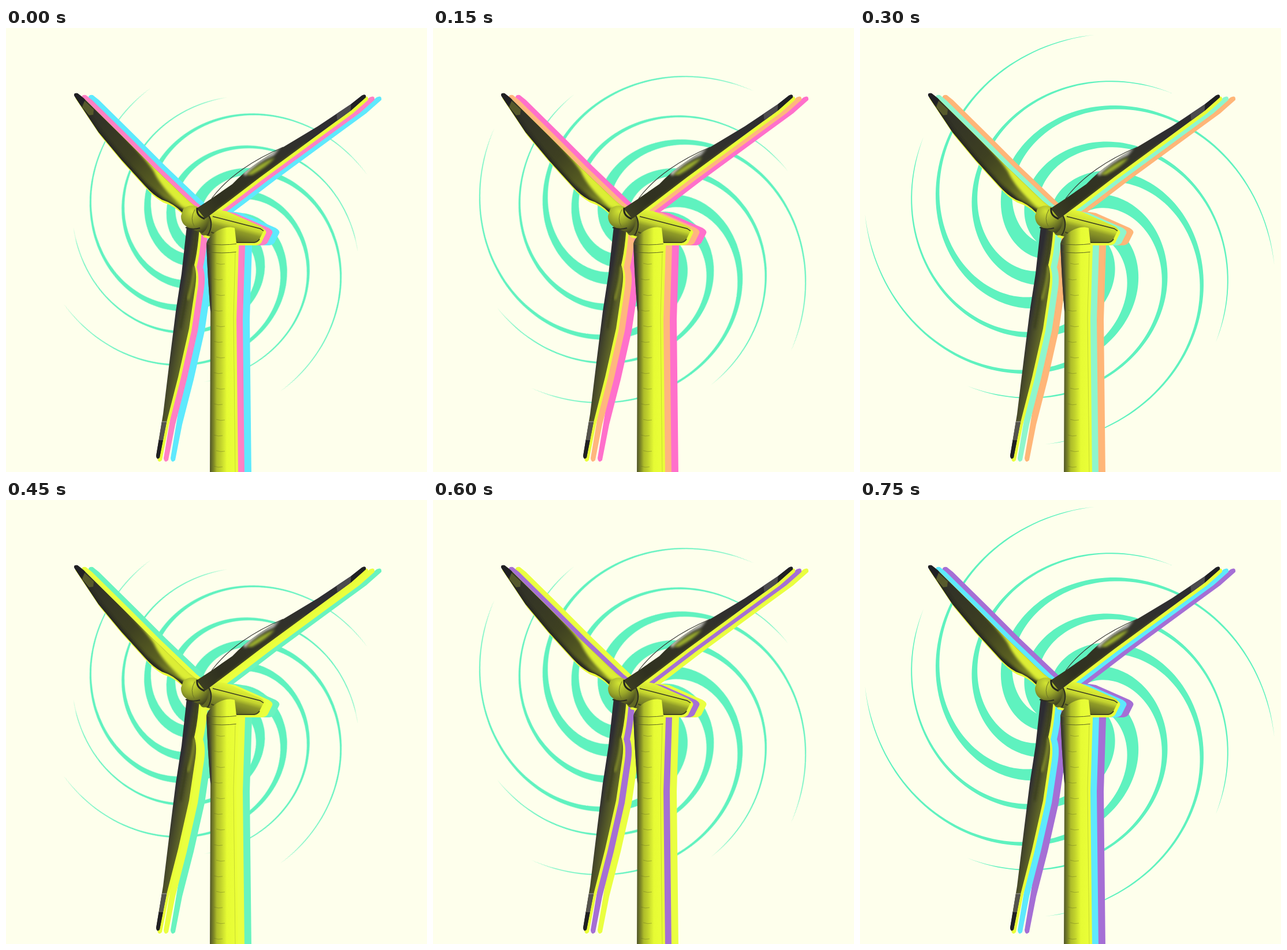
An HTML page for the animation above (900 ms loop, 729x768 px).

```html
<!DOCTYPE html>
<html lang="en">
<head>
<meta charset="utf-8">
<title>Wind turbine</title>
<style>
html, body { margin: 0; width: 100%; height: 100%; overflow: hidden; background: #feffec; }
svg { display: block; width: 729px; height: 768px; }
#spiral { fill: #5ff2bf; animation: spin 450ms step-end infinite; }
#near, #mid, #far { stroke-width: 2; stroke-linejoin: round; stroke: currentColor; fill: currentColor; }
#near { color: #eaff38; }
#mid { animation: midTint 900ms step-end infinite; }
#far { animation: farTint 900ms step-end infinite; }
@keyframes spin {
  0% { transform: translate(363px, 366px) rotate(60deg) scale(.8); }
  33.333% { transform: translate(363px, 366px) rotate(30deg) scale(.9); }
  66.667%, 100% { transform: translate(363px, 366px) rotate(0deg) scale(1); }
}
@keyframes midTint {
  0% { color: #ff80c4; }
  16.667% { color: #ffb67e; }
  33.333% { color: #8ef6cd; }
  50% { color: #eaff40; }
  66.667% { color: #a56fd5; }
  83.333%, 100% { color: #5ee9fd; }
}
@keyframes farTint {
  0% { color: #5ee9fd; }
  16.667% { color: #ff70cb; }
  33.333% { color: #ffb678; }
  50% { color: #69f3bf; }
  66.667% { color: #eaff40; }
  83.333%, 100% { color: #a56fd5; }
}
</style>
</head>
<body>
<svg viewBox="0 0 729 768">
  <defs>
    <path id="tower" d="M347 373 C350 357 378 339 396 346 L399 373 L395 500 L398 772 H353 L354 490 Q349 430 347 373Z"/>
    <path id="nacelle" d="M334 318 Q360 312 382 317 L441 343 Q448 347 446 351 L438 367 Q435 371 428 371 H392 L340 357Z"/>
    <path id="bladeLeft" d="M118 117 Q117 112 124 113 L134 121 L200 186 L250 236 L315 298 L330 310 L306 320 Q290 303 270 297 Q255 289 240 272 L200 228 L160 180 L132 138Z"/>
    <path id="bladeRight" d="M330 312 L356 295 L392 270 Q412 249 434 234 Q455 219 480 206 L540 170 L597 132 L616 117 Q624 113 623 120 L597 143 L560 170 L500 214 L440 258 L385 300 L345 330Z"/>
    <path id="bladeDown" d="M313 343 L304 425 L294 490 L284 570 L272 668 L260 740 Q261 748 266 743 L278 682 L298 604 L317 520 L328 446 Q331 424 326 410 Q332 385 335 345Z"/>
    <g id="turbine">
      <use href="#tower"/><use href="#nacelle"/>
      <use href="#bladeLeft"/><use href="#bladeDown"/><use href="#bladeRight"/>
    </g>
    <clipPath id="inTower"><use href="#tower"/></clipPath>
    <clipPath id="inLeft"><use href="#bladeLeft"/></clipPath>
    <clipPath id="inRight"><use href="#bladeRight"/></clipPath>
    <clipPath id="inDown"><use href="#bladeDown"/></clipPath>

    <linearGradient id="towerTone" gradientUnits="userSpaceOnUse" x1="350" x2="400">
      <stop offset="0" stop-color="#45472f"/><stop offset=".1" stop-color="#5d6329"/>
      <stop offset=".2" stop-color="#818b27"/><stop offset=".3" stop-color="#aebc2a"/>
      <stop offset=".45" stop-color="#c3d42d"/><stop offset=".65" stop-color="#e6fb34"/>
      <stop offset="1" stop-color="#eaff38"/>
    </linearGradient>
    <linearGradient id="nacelleTone" gradientUnits="userSpaceOnUse" x1="396" y1="322" x2="382" y2="374">
      <stop offset="0" stop-color="#e3f636"/><stop offset=".35" stop-color="#c5d52f"/>
      <stop offset=".5" stop-color="#8f9b27"/><stop offset="1" stop-color="#4b4f22"/>
    </linearGradient>
    <linearGradient id="leftTone" gradientUnits="userSpaceOnUse" x1="130" y1="125" x2="315" y2="312">
      <stop offset="0" stop-color="#2c2c2a"/><stop offset=".5" stop-color="#3e4021"/>
      <stop offset=".75" stop-color="#5a6021"/><stop offset=".9" stop-color="#7d8724"/>
      <stop offset="1" stop-color="#b5c42c"/>
    </linearGradient>
    <linearGradient id="rightTone" gradientUnits="userSpaceOnUse" x1="335" y1="320" x2="610" y2="125">
      <stop offset="0" stop-color="#3b3d22"/><stop offset=".12" stop-color="#303120"/>
      <stop offset=".4" stop-color="#343526"/><stop offset=".7" stop-color="#2f2e30"/>
      <stop offset="1" stop-color="#2b2a2f"/>
    </linearGradient>
    <linearGradient id="downTone" gradientUnits="userSpaceOnUse" x1="292" y1="505" x2="319" y2="510">
      <stop offset="0" stop-color="#2d2c32"/><stop offset=".3" stop-color="#42442a"/>
      <stop offset="1" stop-color="#666d26"/>
    </linearGradient>
    <radialGradient id="hubTone" cx=".4" cy=".2" r=".85">
      <stop offset="0" stop-color="#d3e533"/><stop offset=".5" stop-color="#97a429"/>
      <stop offset="1" stop-color="#3f421f"/>
    </radialGradient>
    <filter id="soft"><feGaussianBlur stdDeviation="2"/></filter>
  </defs>

  <path id="spiral"/>
  <use id="far" href="#turbine" x="26" y="4"/>
  <use id="mid" href="#turbine" x="14" y="4"/>
  <use id="near" href="#turbine" x="3" y="4"/>

  <use href="#nacelle" fill="url(#nacelleTone)"/>
  <path d="M358 326 L440 347 L446 351" fill="none" stroke="#34361f" stroke-width="1.5"/>
  <path d="M355 353 L400 371 H430 Q436 370 439 365" fill="none" stroke="#43461f" stroke-width="2"/>

  <use href="#tower" fill="url(#towerTone)"/>
  <g clip-path="url(#inTower)" fill="none" stroke="#5c6424">
    <path d="M346 373 Q373 377 402 373 M347 387 Q373 391 402 387"/>
    <path d="M347 374 Q350 440 355 490" stroke="#34332e" stroke-width="6" filter="url(#soft)"/>
    <path d="M397 388 L394 500 L397 768" stroke="#c6d732"/>
    <path id="seams" opacity=".4"/>
  </g>

  <use href="#bladeLeft" fill="url(#leftTone)"/>
  <g clip-path="url(#inLeft)">
    <path d="M120 125 L160 182 L200 230 L240 274 L270 299 L308 320" fill="none" stroke="#252522" stroke-width="11" filter="url(#soft)"/>
    <path d="M195 176 Q242 226 256 248 Q268 276 306 309 L335 316 L250 230Z" fill="#dcee35" filter="url(#soft)"/>
    <path d="M112 105 H138 L137 126 L128 136Z" fill="#202023"/>
    <path d="M136 126 L152 141 L151 150 L144 151 L132 137Z" fill="#56592b"/>
  </g>

  <use href="#bladeDown" fill="url(#downTone)"/>
  <g clip-path="url(#inDown)">
    <path d="M330 350 Q327 390 321 412 Q324 433 312 465 L302 520" fill="none" stroke="#35371f" stroke-width="3" filter="url(#soft)"/>
    <path d="M326 412 Q325 435 315 470" fill="none" stroke="#9ba82a" stroke-width="3" filter="url(#soft)"/>
    <path d="M255 680 H282 L275 714 H255Z" fill="#55544d"/>
    <path d="M255 713 H282 V752 H255Z" fill="#202023"/>
    <path d="M262 681 H280" stroke="#a5a691"/>
  </g>

  <ellipse cx="345" cy="341" rx="10" ry="18" fill="#606724" transform="rotate(12 345 341)"/>
  <path d="M350 322 Q361 340 349 359" fill="none" stroke="#2b2c20" stroke-width="2"/>
  <path d="M307 313 Q317 304 331 309 L349 325 Q354 344 340 355 L317 346 Q303 340 303 325Z" fill="url(#hubTone)"/>
  <path d="M311 345 Q323 350 336 346" fill="none" stroke="#2b2c20" stroke-width="2"/>
  <path d="M327 314 Q318 330 326 343" fill="none" stroke="#6b7325"/>

  <use href="#bladeRight" fill="url(#rightTone)"/>
  <g clip-path="url(#inRight)">
    <path d="M410 250 Q440 224 474 208 L464 220 Q436 232 414 256Z" fill="#c4c4c0" filter="url(#soft)"/>
    <path d="M416 254 Q442 232 466 224 Q452 240 426 254Z" fill="#9db02f" filter="url(#soft)"/>
    <path d="M365 316 L440 260 L520 201" fill="none" stroke="#62681f" stroke-width="3" filter="url(#soft)"/>
    <path d="M572 145 L598 127 L596 149 L574 163Z" fill="#4c4b4e"/>
    <path d="M598 125 L630 105 V125 L597 149Z" fill="#202023"/>
  </g>
  <path d="M356 295 Q377 267 410 244 Q440 223 480 206" fill="none" stroke="#3a3a36" stroke-width="1.2"/>
  <path d="M331 311 Q329 325 344 330" fill="none" stroke="#24251d" stroke-width="3"/>
</svg>
<script>
const REACH = 242; // degrees from an arm's tip to the centre

function arm(tipAngle, tipRadius) {
  const outer = [], inner = [];
  const point = (radius, degrees) => {
    const a = degrees * Math.PI / 180;
    return `${(radius * Math.cos(a)).toFixed(2)} ${(radius * Math.sin(a)).toFixed(2)}`;
  };
  for (let u = 0; u <= 224; u += 2) {
    const radius = tipRadius * (1 - u / REACH);
    const half = (Math.min(1, u / 10) + 0.05 * u + 4e-6 * u ** 3) / 2;
    outer.push(point(radius + half, tipAngle - u));
    inner.unshift(point(Math.max(0, radius - half), tipAngle - u));
  }
  return `M${outer.concat(inner).join("L")}Z`;
}

let arms = "";
for (let turn = 0; turn < 360; turn += 90) {
  arms += arm(turn + 7, 357) + arm(turn + 35, 309);
}
document.getElementById("spiral").setAttribute("d", arms);

let seams = "";
for (let y = 407, i = 0; y < 768; y += 27, i++) {
  seams += `M${i % 2 ? 360 : 364} ${y}q8 3 15 1`;
}
document.getElementById("seams").setAttribute("d", seams);
</script>
</body>
</html>
```
